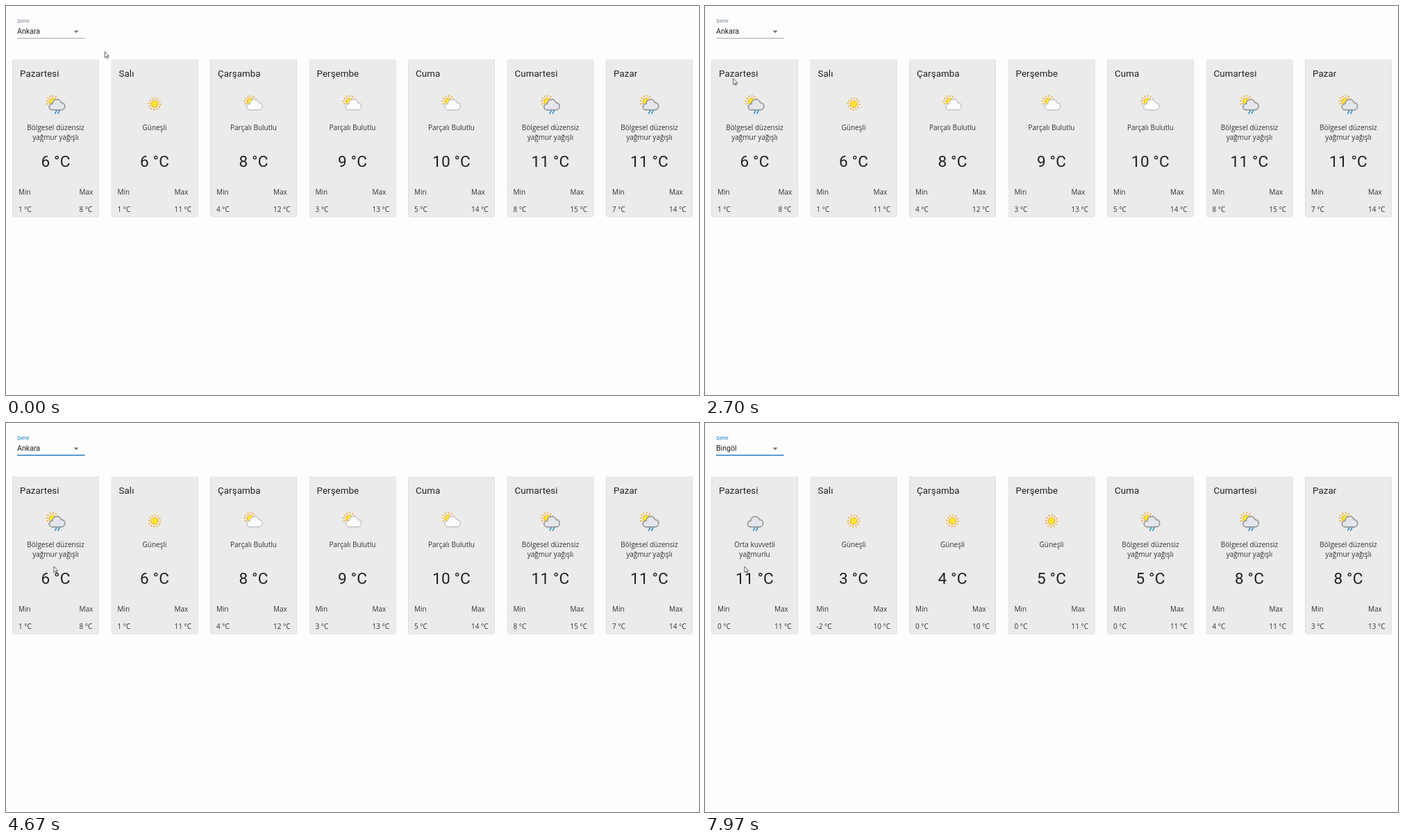
An HTML page that plays this animation: 998x561 px, repeating every 8000 ms.

```html
<!DOCTYPE html>
<html lang="tr">
<head>
<meta charset="utf-8">
<title>Hava durumu</title>
<style>
html, body { margin: 0; width: 100%; height: 100%; overflow: hidden; background: #fdfdfd; }
svg { display: block; width: 100%; height: 100%; }
text { fill: #333; font: 10px "Open Sans", sans-serif; }
.title, .city, .label, .degree { font-family: Roboto, sans-serif; fill: #212121; }
.title { font-size: 13.3px; letter-spacing: .0075em; }
.city { font-size: 10.64px; }
.label { font-size: 8px; fill: #7b8794; animation: label 8s infinite linear; }
.degree { font-size: 22.6px; letter-spacing: .007em; }
.mid { text-anchor: middle; }
.card { fill: #ebebeb; filter: drop-shadow(0 .9px .7px rgba(0,0,0,.36)); }

.before, .after, .old, .new, .hover, .arrow, .hand { animation: 8s infinite step-end; }
.before { animation-name: before; }
.after { animation-name: after; }
.old { animation-name: old; }
.new { animation-name: new; }
.hover { animation-name: hover; }
.arrow { animation-name: arrow; }
.hand { animation-name: hover; }
.focus { transform-origin: 64.75px 46.5px; animation: focus 8s infinite linear; }
.pointer { animation: move 8s infinite linear; }

@keyframes before { 0% { visibility: visible } 78.75%, 100% { visibility: hidden } }
@keyframes after { 0% { visibility: hidden } 78.75%, 100% { visibility: visible } }
@keyframes old { 0% { visibility: visible } 70%, 100% { visibility: hidden } }
@keyframes new { 0% { visibility: hidden } 70%, 100% { visibility: visible } }
@keyframes hover { 0% { visibility: hidden } 38% { visibility: visible } 42.5%, 100% { visibility: hidden } }
@keyframes arrow { 0% { visibility: visible } 38% { visibility: hidden } 42.5%, 100% { visibility: visible } }
@keyframes label { 0%, 39.9% { fill: #7b8794 } 42.4%, 100% { fill: #1b80c4 } }
@keyframes focus {
  0%, 39.8% { transform: scaleX(0); animation-timing-function: cubic-bezier(0, 0, .2, 1) }
  42.3%, 100% { transform: none }
}
@keyframes move {
  0%, 7% { transform: translate(142px, 65.5px) }
  13.25%, 15% { transform: translate(143px, 82px); animation-timing-function: ease-in }
  20.5% { transform: translate(200px, 170px) }
  25.88% { transform: translate(302.5px, 328px); animation-timing-function: ease-out }
  27.5% { transform: translate(270px, 364px); animation-timing-function: ease-in }
  31% { transform: translate(2px, 180px); animation-timing-function: ease-out }
  38% { transform: translate(70px, 46px) }
  39.5%, 43% { transform: translate(77px, 36px); animation-timing-function: ease-in-out }
  51.5% { transform: translate(72px, 270px); animation-timing-function: ease-out }
  54% { transform: translate(70px, 364px); animation-timing-function: ease-in-out }
  58%, 63% { transform: translate(68.5px, 206.5px) }
  68%, 78% { transform: translate(68.5px, 197px); animation-timing-function: ease-in-out }
  86%, 100% { transform: translate(56.5px, 206.5px) }
}
</style>
</head>
<body>
<svg viewBox="0 0 998 561" preserveAspectRatio="none">
  <defs>
    <g id="sun">
      <circle r="8.1" fill="none" stroke="#f3a929" stroke-width="2.6" pathLength="12" stroke-dasharray=".36 .64"/>
      <circle r="4.8" fill="#fbe82c" stroke="#efb02a" stroke-width="1.2"/>
    </g>
    <path id="cloud" d="M-6 8.5a4.3 4.3 0 0 1 .3-8.6A6.5 6.5 0 0 1 7-2A5.3 5.3 0 0 1 8 8.5z" stroke-width="1.7"/>
    <path id="drops" d="M.2 9.8l-2 3.8M4.4 9.8l-2 3.8" stroke="#3090d4" stroke-width="1.7" stroke-linecap="round"/>
    <g id="rain">
      <use href="#cloud" fill="#e4e6ec" stroke="#999"/>
      <use href="#drops"/>
    </g>
    <g id="showers"><use href="#sun" x="-4.5" y="-3.5"/><use href="#rain" x="1"/></g>
    <g id="partly"><use href="#sun" x="-4.5" y="-3.5"/><use href="#cloud" x=".5" fill="#fbfbfb" stroke="#cbcbcb"/></g>
  </defs>

  <text class="label" x="16" y="23.5">Şehir</text>
  <text class="city old" x="16" y="40">Ankara</text>
  <text class="city new" x="16" y="40">Bingöl</text>
  <path d="M97.6 35.5h7l-3.5 3.5z" fill="#707070"/>
  <path d="M16 46.5h97.5" stroke="#949494" stroke-width=".8"/>
  <path class="hover" d="M16 46.5h97.5" stroke="#212121" stroke-width="1.4"/>
  <path class="focus" d="M16 46.5h97.5" stroke="#2478bd" stroke-width="1.4"/>

  <g id="week"></g>

  <g class="pointer">
    <path class="arrow" d="M.4.4v8.6l2-1.8 1.3 2.8 1.3-.6-1.3-2.7h2.7z" fill="#fff" stroke="#333" stroke-width=".8"/>
    <path class="hand" d="M-.9 1q0-1 .9-1t.9 1v3l3 .6q1 .3.9 1.3l-.5 4.1h-4.3l-3-3.6q-.3-1 .6-1l1.5.9z"
      fill="#fff" stroke="#333" stroke-width=".8"/>
  </g>
</svg>
<script>
const days = ['Pazartesi', 'Salı', 'Çarşamba', 'Perşembe', 'Cuma', 'Cumartesi', 'Pazar'];
const skies = {
  sun: ['Güneşli'],
  partly: ['Parçalı Bulutlu'],
  showers: ['Bölgesel düzensiz', 'yağmur yağışlı'],
  rain: ['Orta kuvvetli', 'yağmurlu']
};
// Each day: sky, current, minimum, maximum
const forecasts = {
  before: ['showers 6 1 8', 'sun 6 1 11', 'partly 8 4 12', 'partly 9 3 13', 'partly 10 5 14', 'showers 11 8 15', 'showers 11 7 14'],
  after: ['rain 11 0 11', 'sun 3 -2 10', 'sun 4 0 10', 'sun 5 0 11', 'showers 5 0 11', 'showers 8 4 11', 'showers 8 3 13']
};
const pitch = 142.5;

const text = (x, y, content, style = '') => `<text x="${x}" y="${y}" class="${style}">${content}</text>`;

function weather(entry) {
  const [sky, now, min, max] = entry.split(' ');
  const maxX = max.length > 1 ? 100 : 105.5;
  return `<use href="#${sky}" x="71.5" y="141.3"/>` +
    skies[sky].map((line, i) => text(71.5, 179 + i * 14.2, line, 'mid')).join('') +
    text(71.5, 231.5, now + ' °C', 'degree mid') +
    text(18, 296.5, min + ' °C') +
    text(maxX, 272, 'Max') +
    text(maxX, 296.5, max + ' °C');
}

document.getElementById('week').innerHTML = days.map((day, i) =>
  `<g transform="translate(${i * pitch})">
    <rect class="card" x="9.4" y="77" width="124.4" height="227.3" rx="2.7"/>
    ${text(20, 102.4, day, 'title')}${text(18, 272, 'Min')}
    ${Object.keys(forecasts).map(state => `<g class="${state}">${weather(forecasts[state][i])}</g>`).join('')}
  </g>`).join('');
</script>
</body>
</html>
```
